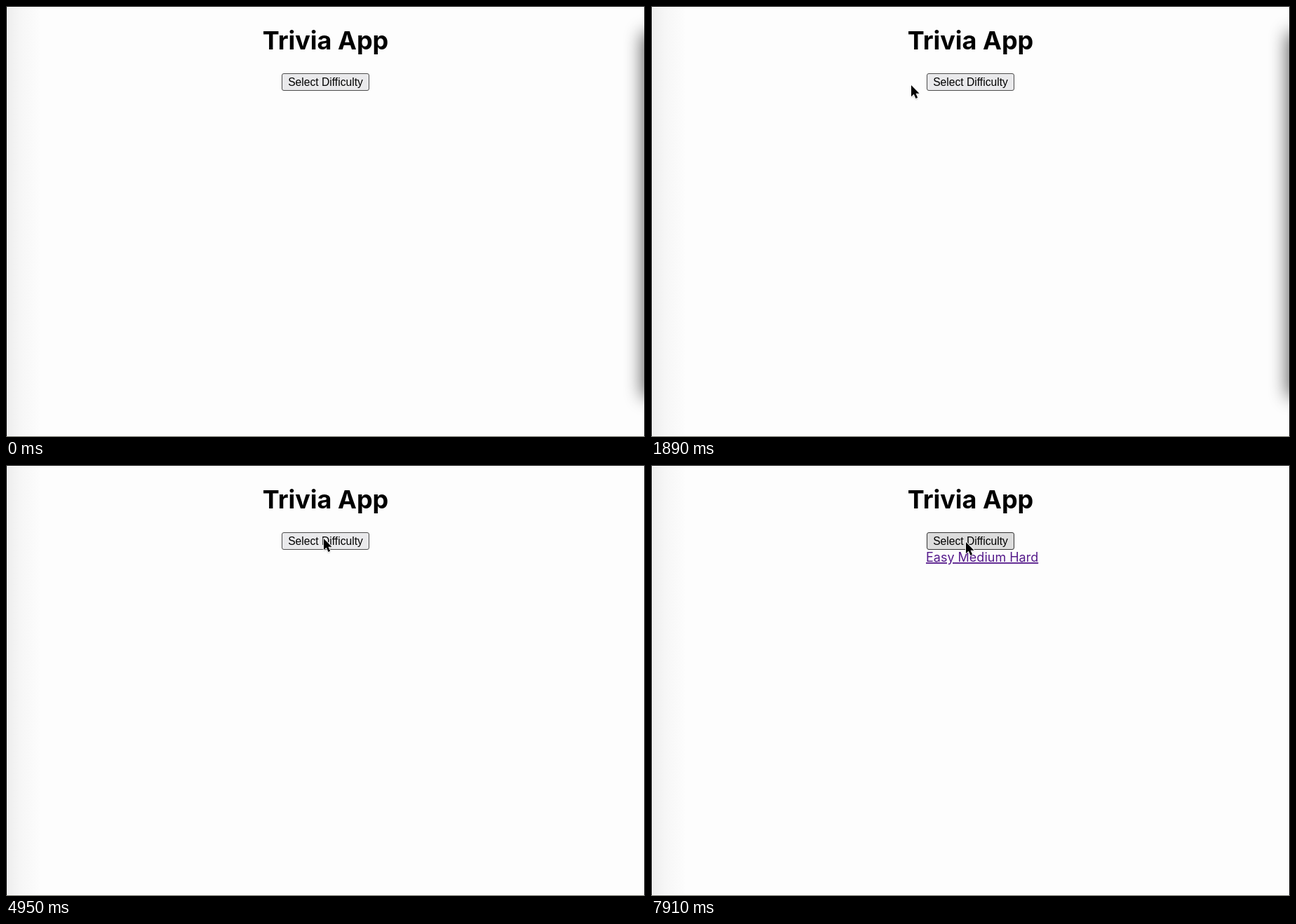
These frames come from a looping animation (911x615 px, 8 s). An HTML page:

```html
<!DOCTYPE html>
<html lang="en">
<head>
<meta charset="utf-8">
<title>Trivia App</title>
<style>
  html, body { margin: 0; width: 100%; height: 100%; overflow: hidden; background: #fdfdfd; }
  svg { display: block; width: 911px; height: 615px; }
  text { white-space: pre; }
  .title { font: 700 36px Inter, sans-serif; }
  .label { font: 15.65px "Liberation Sans", Arial, sans-serif; }
  .links { font: 18px Inter, sans-serif; fill: #551a8b; text-decoration: underline; }
</style>
</head>
<body>
<svg viewBox="0 0 911 615">
  <defs>
    <linearGradient id="shade">
      <stop offset="0" stop-color="#ededed"/>
      <stop offset=".4" stop-color="#f6f6f6"/>
      <stop offset="1" stop-color="#fdfdfd"/>
    </linearGradient>
    <filter id="blur" filterUnits="userSpaceOnUse" x="820" y="-60" width="240" height="740">
      <feGaussianBlur stdDeviation="13"/>
    </filter>
    <filter id="soft" x="-50%" y="-50%" width="200%" height="200%">
      <feGaussianBlur stdDeviation="1.1"/>
    </filter>
    <path id="arrow" d="M0 0V16.2L3.7 12.8L6.5 19L9.2 17.8L6.5 11.7H11.5Z"/>
  </defs>

  <rect width="911" height="615" fill="#fdfdfd"/>
  <rect width="50" height="615" fill="url(#shade)"/>
  <rect id="shadow" x="907" y="38" width="110" height="520" opacity=".62" filter="url(#blur)"/>

  <text class="title" x="455.5" y="62" text-anchor="middle">Trivia App</text>
  <rect id="button" x="393.5" y="96.5" width="124" height="24" rx="2.5"/>
  <text class="label" x="455.5" y="114" text-anchor="middle">Select Difficulty</text>
  <text class="links" id="links" x="392" y="138">Easy Medium Hard</text>

  <g id="cursor">
    <use href="#arrow" y="1.5" opacity=".35" filter="url(#soft)"/>
    <use href="#arrow" stroke="#fff" stroke-width="1.8" stroke-linejoin="round"/>
    <use href="#arrow"/>
  </g>

  <path d="M.5 615V.5H910.5V615" fill="none" stroke="#000"/>
  <path d="M0 614.5H911" stroke="#6b6b62"/>
</svg>
<script>
  const LOOP = 8000;
  const $ = id => document.getElementById(id);
  const [shadow, button, links, cursor] = ["shadow", "button", "links", "cursor"].map($);

  // time, x, y of the pointer tip
  const path = [
    [1150, -14, 330], [1700, 369, 118], [1890, 371, 113], [2050, 371, 113],
    [2600, 453, 103], [4300, 453, 103], [4600, 453, 105],
    [5950, 453, 105], [6400, 449, 110], [LOOP, 449, 110]
  ];
  // start time, fill, border
  const looks = [
    [0, "#e9e9eb", "#4c4c4c"], [6680, "#f2f2f2", "#666"], [6900, "#dcdcdc", "#333"]
  ];

  const ease = u => u * u * (3 - 2 * u);

  function pointerAt(t) {
    const i = path.findIndex(p => p[0] > t);
    if (i <= 0) return [-40, 330];
    const [t0, x0, y0] = path[i - 1], [t1, x1, y1] = path[i];
    const k = ease((t - t0) / (t1 - t0));
    return [x0 + (x1 - x0) * k, y0 + (y1 - y0) * k];
  }

  function draw(t) {
    const [x, y] = pointerAt(t);
    cursor.setAttribute("transform", `translate(${x} ${y})`);
    const [, fill, border] = looks.filter(l => l[0] <= t).pop();
    button.setAttribute("fill", fill);
    button.setAttribute("stroke", border);
    shadow.style.display = t < 3000 ? "" : "none";
    links.style.display = t < 6900 ? "none" : "";
  }

  const start = performance.now();
  function tick() {
    draw((performance.now() - start) % LOOP);
    requestAnimationFrame(tick);
  }
  tick();
</script>
</body>
</html>
```
